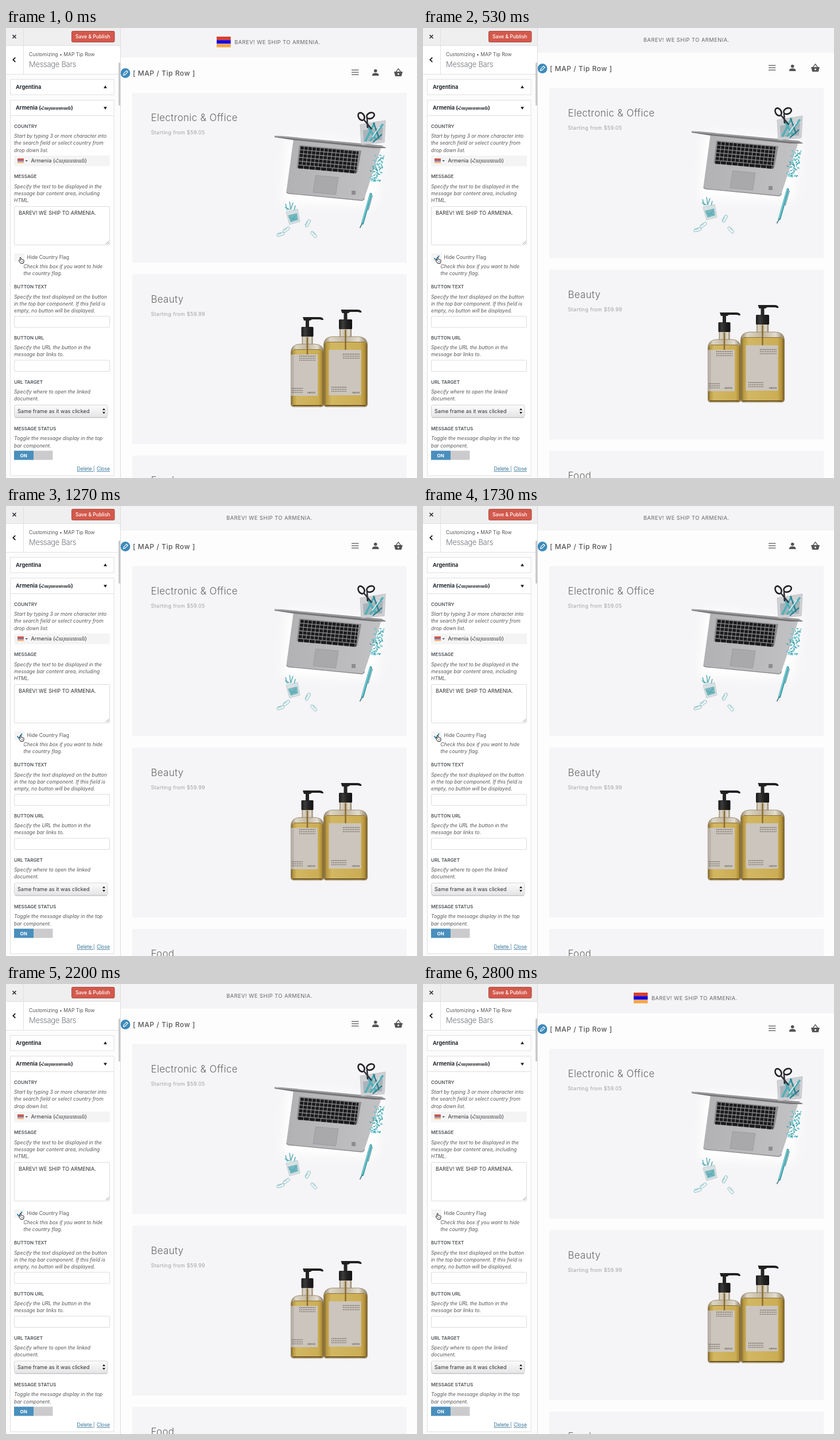
Write an HTML page that moves like this. It is 716 by 783 pixels and loops after 2.87 s.

```html
<!DOCTYPE html>
<html lang="en">
<head>
<meta charset="utf-8">
<title>Message bar settings</title>
<style>
  html, body { margin: 0; width: 100%; height: 100%; overflow: hidden; background: #fdfdfd; }
  svg { display: block; width: 716px; height: 783px; font-family: Inter, "Open Sans", sans-serif; }
  text { white-space: pre; }
  .small { font-size: 8.6px; fill: #555; }
  .note { font-size: 8.6px; font-style: italic; fill: #555; }
  .label { font-size: 8.15px; font-weight: 600; fill: #4f5357; }
  .bold { font-size: 9.2px; font-weight: 700; fill: #23282d; }
  .value { font-size: 9.15px; fill: #2e3033; }
  .head { font-size: 13px; font-weight: 300; letter-spacing: -.3px; fill: #70757a; }
  .link { font-size: 8.55px; fill: #2f7096; text-decoration: underline; }
  .white { font-size: 8.6px; font-weight: 500; fill: #fff; }
  .armenian { font-family: "DejaVu Serif", "DejaVu Sans", serif; font-style: italic; }
  .notice { font-size: 9.3px; letter-spacing: .47px; fill: #666; }
  .brand { font-size: 12px; font-weight: 500; letter-spacing: .55px; fill: #555; }
  .title { font-size: 16.8px; font-weight: 300; letter-spacing: .4px; fill: #666; }
  .price { font-size: 8.8px; letter-spacing: .4px; fill: #a0a0a2; }
</style>
</head>
<body>
<svg id="stage" viewBox="0 0 716 783" xmlns="http://www.w3.org/2000/svg"></svg>
<script>
const LOOP = 2870, HIDE_AT = 400, SHOW_AT = 2400, BAR_SHRINK = 8;
const FLAG = ['#d8402f', '#1203e6', '#f5a64a'], PALE_FLAG = ['#cf4a40', '#8a6f9e', '#efb474'];

const rect = (x, y, w, h, fill, more = '') =>
  `<rect x="${x}" y="${y}" width="${w}" height="${h}" fill="${fill}" ${more}/>`;
const path = (d, fill, more = '') => `<path d="${d}" fill="${fill}" ${more}/>`;
const line = (d, color, width, more = '') =>
  path(d, 'none', `stroke="${color}" stroke-width="${width}" ${more}`);
const text = (cls, x, y, ...rows) => rows.map((row, i) =>
  `<text class="${cls}" x="${x}" y="${y + i * 12.2}">${row}</text>`).join('');
const field = (y, h) => rect(14.5, y + .5, 166, h, '#fff', 'rx="1.5" stroke="#dcdcde"');
const flag = (x, y, w, h, colors) => colors.map((c, i) =>
  rect(x, y + i * h / 3, w, h / 3 + .1, c)).join('');
const round = 'stroke-linecap="round" stroke-linejoin="round"';

// Repeatable random numbers for the scattered pins
let seed = 7;
const random = () => (seed = seed * 16807 % 2147483647) / 2147483647;
const spread = size => (random() + random() - 1) * size;

function gradient(id, stops, dir = 'x2="1" y2="0"') {
  return `<linearGradient id="${id}" x1="0" y1="0" ${dir}>` + stops.map(([at, color]) =>
    `<stop offset="${at}" stop-color="${color}"/>`).join('') + '</linearGradient>';
}

function defs() {
  return '<defs>' +
    gradient('oil', [[0, '#80682c'], [.06, '#bb9a42'], [.17, '#d2b763'], [.85, '#cbad54'], [.95, '#b18f38'], [1, '#75591f']]) +
    gradient('glass', [[0, '#90826a'], [.15, '#ddd7c9'], [.5, '#c2b69f'], [.8, '#e2ddd2'], [1, '#8a7b62']]) +
    gradient('pump', [[0, '#191919'], [.3, '#3d3c3b'], [.6, '#222'], [1, '#131313']]) +
    gradient('silver', [[0, '#b2b2b4'], [1, '#c2c2c4']]) +
    gradient('select', [[0, '#fcfcfc'], [1, '#e4e4e6']], 'x2="0" y2="1"') +
    '<filter id="soft" x="-20%" y="-20%" width="140%" height="140%"><feGaussianBlur stdDeviation="9"/></filter>' +
    '</defs>';
}

function sidebar() {
  const armenian = size => `<tspan class="armenian" font-size="${size}">Հայաստան</tspan>`;
  return rect(0, 0, 199, 783, '#fcfcfc') +
    rect(0, 0, 199, 30, '#efeff0') +
    rect(0, 30, 199, 51, '#fff') +
    line('M0 30.5H199M0 80.5H199M30.5 0V81', '#e0e0e2', 1) +
    line('M11.5 12L17.5 18M17.5 12L11.5 18', '#30343a', 1.7) +
    line('M16.3 51.3L12.4 55.2L16.3 59.1', '#191e23', 1.9) +
    rect(114.5, 5.5, 74.5, 19, '#d3594c', 'rx="2" stroke="#aa4c42"') +
    text('white', 121, 18.2, 'Save &amp; Publish') +
    text('small', 40, 49, 'Customizing • MAP Tip Row') +
    text('head', 40, 68, 'Message Bars') +
    rect(196, 60, 3.5, 75, '#c9c9cb', 'rx="1.7"') +
    line('M199.5 0V783', '#dcdcde', 1) +

    rect(7.5, 89.5, 180.5, 26.5, '#fff', 'stroke="#e0e0e2"') +
    rect(7.5, 125.5, 180.5, 653.5, '#fff', 'stroke="#e0e0e2"') +
    line('M7 152.5H188', '#dedee0', 1) +
    text('bold', 17, 105.5, 'Argentina') +
    text('bold', 17, 141.8, `Armenia (${armenian(7.8)})`) +
    path('M170 104.8H176L173 100ZM170 137.2H176L173 142Z', '#1b1e22') +

    text('label', 14, 174, 'COUNTRY') +
    text('note', 14, 191.2, 'Start by typing 3 or more character into',
      'the search field or select country from', 'drop down list.') +
    rect(14, 222, 167, 18.5, '#f4f4f5', 'rx="1"') +
    flag(20, 227, 11, 8, PALE_FLAG) +
    path('M33.5 230H38L35.7 232.7Z', '#555') +
    text('value', 43.5, 234.3, `Armenia (${armenian(8.6)})`) +

    text('label', 14, 261.3, 'MESSAGE') +
    text('note', 14, 278.6, 'Specify the text to be displayed in the',
      'message bar content area, including', 'HTML.') +
    field(310, 67) +
    text('value', 22, 324.5, 'BAREV! WE SHIP TO ARMENIA.') +
    line('M174 376L179.5 370.5M177 376L179.5 373.5', '#777', .8) +

    rect(14.5, 392, 18, 15, '#f4f4f5', 'rx="1"') +
    `<g id="check">${line('M19.5 400.5L23 404L28 396', '#2f86b6', 2)}</g>` +
    text('small', 36.5, 402.3, 'Hide Country Flag') +
    text('note', 30.5, 418, 'Check this box if you want to hide', 'the country flag.') +

    text('label', 14, 453.2, 'BUTTON TEXT') +
    text('note', 14, 470.7, 'Specify the text displayed on the button',
      'in the top bar component. If this field is', 'empty, no button will be displayed.') +
    field(501, 19.5) +
    text('label', 14, 542, 'BUTTON URL') +
    text('note', 14, 559, 'Specify the URL the button in the', 'message bar links to.') +
    field(577.5, 19.5) +
    text('label', 14, 618.7, 'URL TARGET') +
    text('note', 14, 636, 'Specify where to open the linked', 'document.') +
    rect(14.5, 656, 162.5, 21.5, 'url(#select)', 'rx="3" stroke="#d2d2d4"') +
    line('M16 678H176', '#b9b9bb', 1) +
    text('value', 20, 670, 'Same frame as it was clicked') +
    path('M168 665H173L170.5 661.5ZM168 668H173L170.5 671.5Z', '#222') +

    text('label', 14, 700, 'MESSAGE STATUS') +
    text('note', 14, 717.3, 'Toggle the message display in the top', 'bar component.') +
    rect(14, 735.5, 34, 16, '#4a8fbd') + rect(48, 735.5, 33.5, 16, '#cbcbcd') +
    '<text x="24.5" y="746.5" font-size="8" font-weight="700" fill="#fff">ON</text>' +
    text('link', 123.5, 770.3, 'Delete |') + text('link', 158, 770.3, 'Close') +
    path('M25.2 409.2L22.4 404.8Q22.4 403 24.3 403.8L25.1 404.6L24.3 400Q24.7 398.2 26.1 399.6L27 402.8L28.2 402.5L29.2 403.1L30.4 403.2L31.2 404.3Q31.5 407 30.2 409.2Z',
      '#fff', `stroke="#222" stroke-width="1" ${round}`) +
    line('M27.2 405.2V407.5M29 405.2V407.5', '#333', .6);
}

function header() {
  return '<circle cx="208" cy="78.5" r="9" fill="#fff"/><circle cx="208" cy="78.5" r="8.4" fill="#3c8abb"/>' +
    path('M204.6 82.2L205.2 79.2L210 74.4L212.2 76.6L207.4 81.4Z', 'none', 'stroke="#fff" stroke-width="1.2"') +
    text('brand', 221, 82.5, '[ MAP / Tip Row ]') +
    line('M602 73.2H614.5M602 77.2H614.5M602 81.2H614.5', '#555', 1.2) +
    '<circle cx="643.7" cy="74.5" r="2.8" fill="#555"/>' +
    path('M638 83V81.2Q638.6 78.3 643.7 78.3Q648.8 78.3 649.4 81.2V83Z', '#555') +
    path('M676 76H691L688.8 84H678.2Z', '#555') +
    line('M679.3 76.3L683.5 70.8L687.7 76.3', '#555', 1.4) +
    '<circle cx="683.5" cy="80" r="1.5" fill="#f8f8f8"/>';
}

function card(y, title, price) {
  return rect(220, y, 478, 295.5, '#f5f4f6') +
    text('title', 252.5, y + 49, title) + text('price', 252.5, y + 72.5, price);
}

function laptop() {
  let keys = '';
  for (let row = 0; row < 6; row++) {
    const x = 513 - row * .8, y = 208.5 + row * 6.6;
    keys += line(`M${x} ${y}L${x + 101} ${y + 9}`, '#1b1b1d', 5.3,
      `stroke-dasharray="${row === 5 ? '9 1' : '5.9 1.1'}"`);
  }
  return path('M490 190L660 205L645 310L480 305Z', '#fff', 'filter="url(#soft)"') +
    path('M501 192L654 207L624.5 296Q623 300 619 299.5L493 287.5Q488 287 488.6 283Z', 'url(#silver)') +
    line('M488.8 285Q489.5 287.5 493 288L619 300Q623 300.3 624.5 296', '#88888b', 1.3) +
    path('M511 203.8L619 213.5L612 251.5L506.5 243Z', '#8c8c8f') + keys +
    path('M539.5 256.5L579 260L574.5 290L535 286Z', '#a9a9ab', 'stroke="#949497" stroke-width=".7"') +
    path('M468 187.5L480 188L655 204.5L662.5 209L640 209L500 195L468 190Z', '#77777a') +
    line('M469 188.3L660 206.8', '#bcbcbe', 1) +
    rect(602, 283, 7, 7, '#8c8c8f');
}

function deskItems() {
  let pins = '';
  for (let i = 0; i < 75; i++) {
    const down = random() * 46;
    const x = 651 - down * .2 + spread(11), y = 222 + down + spread(3), a = random() * 6.3;
    pins += line(`M${x.toFixed(1)} ${y.toFixed(1)}l${(2.2 * Math.cos(a)).toFixed(1)} ${(2.2 * Math.sin(a)).toFixed(1)}`,
      i % 3 ? '#6fc4cc' : '#3a9ca7', 1.6, round);
  }
  const clip = (x, y, angle) => `<g transform="translate(${x} ${y}) rotate(${angle})">` +
    line('M-5 -2.6H4Q7 -2.6 7 0T4 2.6H-4Q-6.5 2.6 -6.5 .5T-4 -1.2H3', '#7cc0c6', .9) + '</g>';
  const cup = path('M617 168L661 161L659 199L619 203Z', '#cbcdd1', 'opacity=".9"') +
    path('M622 178L657 173L655 195L623 198Z', '#a8b4b9') +
    line('M626 197L642 165M634 197L657 167M645 195L629 169', '#4fafb9', 3.6) +
    line('M650 192L640 164M639 199L655 185', '#277f8b', 2.3) +
    line('M638 190L651 172', '#e6f2f3', 1.5) +
    line('M617 168L661 161L659 199L619 203Z', '#b9bbc0', .8);
  const scissors = '<g fill="none" stroke="#222327" stroke-width="2.6">' +
    '<ellipse cx="619" cy="154" rx="5" ry="7" transform="rotate(-30 619 154)"/>' +
    '<ellipse cx="635" cy="152.5" rx="7" ry="5" transform="rotate(-25 635 152.5)"/></g>' +
    line('M623 159L637 176M629 157L630 174', '#303238', 2.6);
  const pen = line('M635.5 289L621 340', '#3596a1', 4.4, round) +
    line('M634.9 289L620.6 339', '#72cad1', 2.2, round) +
    line('M620.5 340L616.5 348', '#4e8289', 1.7) + line('M638.5 291L631 317', '#287e89', 1);
  const jar = path('M488 320L508 315L512 337L494 342Z', '#cfdcdf', 'opacity=".8"') +
    path('M491 326L507 322L509 334L496 338Z', '#79b7bf') +
    line('M487 306l3 11M494 302l2 14M500 304l-4 12M504 309l-2 8M486 312l8 4M494 330l12 3M497 336l9 -11', '#58adb6', 1.5) +
    line('M488 320L508 315L512 337L494 342Z', '#b5c5c8', .8);
  return cup + scissors + pins + pen + jar +
    clip(478, 359, -15) + clip(488, 351, -35) + clip(525.5, 340, -60) + clip(536, 359, 50);
}

function print(x, y, rows, w) {
  let d = '';
  for (let i = 0; i < rows; i++) d += `M${x} ${y + i * 3.6}h${w}`;
  return line(d, '#5a544c', 1.3, 'stroke-dasharray="1.5 1.5"');
}

function bottle(x, top, w, neck, label) {
  const mid = x + w / 2, right = x + w, n = neck / 2, foot = 659.5;
  const capTop = top - 30, nozzle = capTop - 17;
  // Body outline: inset from the glass wall, starting at y with a shoulder of the given size
  const body = (y, inset, shoulder) => {
    const l = x + inset, r = right - inset, b = foot - inset;
    return `M${l + shoulder} ${y}H${r - shoulder}Q${r} ${y + 1} ${r} ${y + shoulder}V${b - 5}Q${r} ${b} ${r - 5} ${b}` +
      `H${l + 5}Q${l} ${b} ${l} ${b - 5}V${y + shoulder}Q${l} ${y + 1} ${l + shoulder} ${y}Z`;
  };
  return rect(mid - n, top - 14, neck, 16, 'url(#glass)') +
    path(body(top, .4, 15), 'url(#glass)', 'stroke="#8a7752" stroke-width=".8"') +
    path(body(top + 9, 1.2, 6), 'url(#oil)') +
    line(`M${x + 6} ${top + 9.5}H${right - 6}`, '#8e7130', 1.1) +
    line(`M${mid} ${top - 12}V${label[1]}`, '#8a6c32', 2.5) +
    line(`M${x + 4} ${foot - 2.5}H${right - 4}`, '#6b5220', 2) +
    rect(mid - n - 1, capTop, neck + 2, 17, 'url(#pump)', 'rx="1.5"') +
    rect(mid - 3, nozzle + 2, 6, 17, '#262626') +
    path(`M${mid - 8} ${nozzle}H${mid + 20}Q${mid + 28} ${nozzle} ${mid + 28} ${nozzle + 5}L${mid + 25} ${nozzle + 5}` +
      `Q${mid + 23} ${nozzle + 3.5} ${mid + 18} ${nozzle + 4}H${mid + 8}L${mid + 5} ${nozzle + 6}H${mid - 6}Z`, '#202020') +
    rect(...label, '#cbc5bd');
}

function bottles() {
  const mark = (x, y) =>
    `<text x="${x}" y="${y}" font-family="Noto Serif, serif" font-size="4" fill="#3b3733">ORVEN</text>`;
  return bottle(496, 550, 58, 19, [496.5, 568, 46.5, 72]) +
    rect(496.5, 568, 5, 72, '#aea79d', 'opacity=".6"') +
    print(511, 571, 3, 28) + print(498, 627, 3, 19) + mark(525, 636) +
    bottle(553, 537, 77, 21, [562.5, 560, 56, 79]) +
    print(587, 567.5, 3, 29) + print(567, 625, 3, 26) + mark(602.5, 635.5);
}

const stage = document.getElementById('stage');
stage.innerHTML = defs() + rect(0, 0, 716, 783, '#fdfdfd') +
  `<g id="page">${rect(200, -10, 516, 61, '#f4f4f6')}` +
  card(112.8, 'Electronic &amp; Office', 'Starting from $59.05') + laptop() + deskItems() +
  card(428.5, 'Beauty', 'Starting from $59.99') + bottles() +
  card(744, 'Food', 'Starting from $19.99') + '</g>' +
  sidebar() + `<g id="header">${header()}</g>` +
  `<g id="flag">${flag(367, 15, 24.5, 18.5, FLAG)}</g>` +
  `<g id="notice">${text('notice', 398, 28.3, 'BAREV! WE SHIP TO ARMENIA.')}</g>`;

const part = Object.fromEntries(['page', 'header', 'flag', 'notice', 'check']
  .map(id => [id, document.getElementById(id)]));

function render(time) {
  const hidden = time >= HIDE_AT && time < SHOW_AT;
  const lift = `translate(0 ${hidden ? -BAR_SHRINK : 0})`;
  part.page.setAttribute('transform', lift);
  part.header.setAttribute('transform', lift);
  part.notice.setAttribute('transform', hidden ? 'translate(-14 -4)' : 'translate(0 0)');
  part.flag.setAttribute('visibility', hidden ? 'hidden' : 'visible');
  part.check.setAttribute('visibility', hidden ? 'visible' : 'hidden');
}

const start = performance.now();
function tick() {
  render((performance.now() - start) % LOOP);
  requestAnimationFrame(tick);
}
tick();
</script>
</body>
</html>
```
